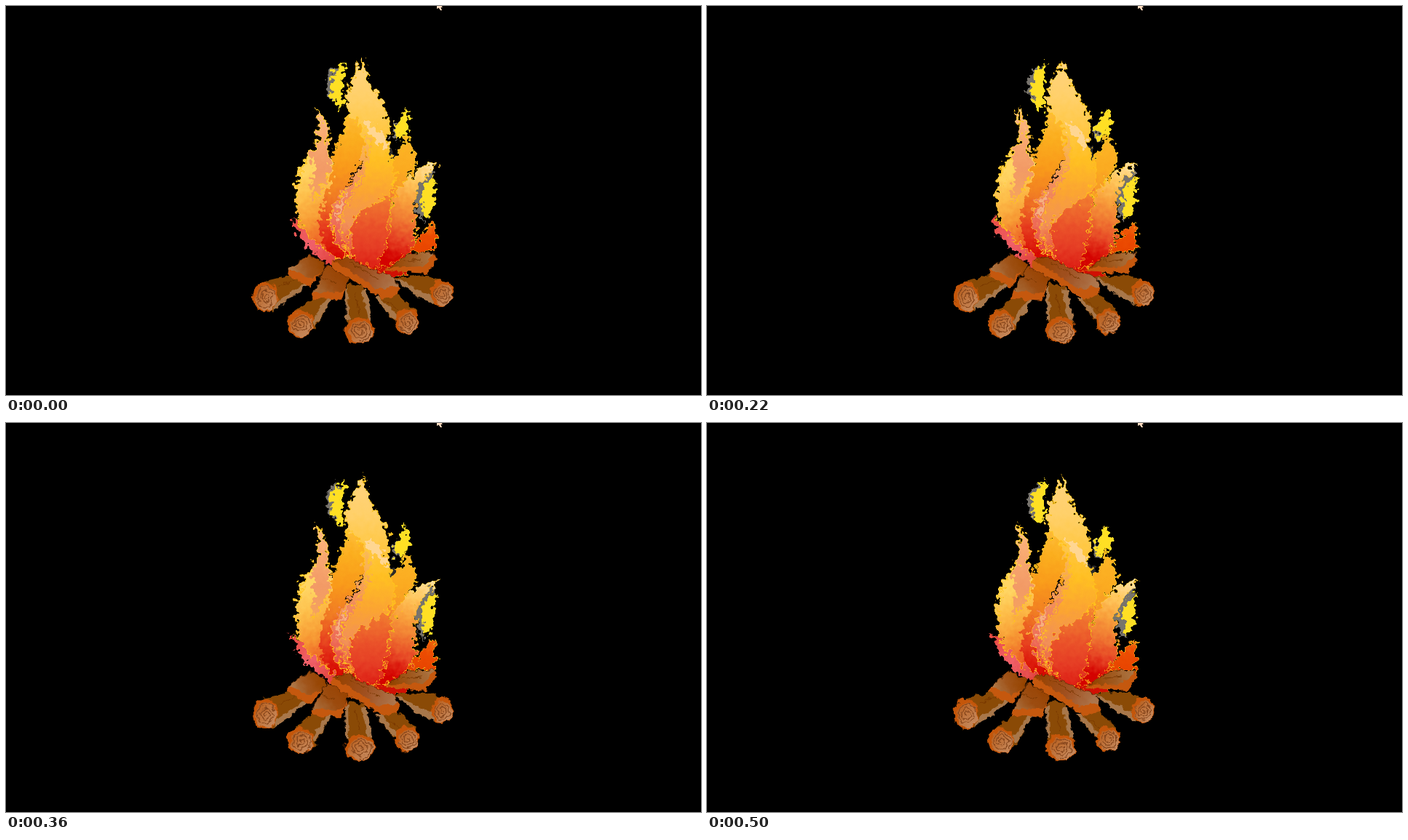
These frames come from a looping animation (955 px wide and 535 px high, 0.55 s). An HTML page:

```html
<!DOCTYPE html>
<html lang="en">
<head>
<meta charset="utf-8">
<title>Campfire</title>
<style>
html, body { margin: 0; width: 100%; height: 100%; overflow: hidden; background: #000; }
svg { display: block; width: 955px; height: 535px; }
</style>
</head>
<body>
<svg id="stage" viewBox="0 0 955 535" xmlns="http://www.w3.org/2000/svg"></svg>
<script>
const stage = document.getElementById('stage');

// Vertical or slanted gradient: line is [x1, y1, x2, y2], stops are evenly spaced
const grad = (id, [x1, y1, x2, y2], ...cols) =>
  `<linearGradient id="${id}" gradientUnits="userSpaceOnUse" x1="${x1}" y1="${y1}" x2="${x2}" y2="${y2}">` +
  cols.map((c, i) => `<stop offset="${i / (cols.length - 1)}" stop-color="${c}"/>`).join('') +
  '</linearGradient>';

const rough = (id, freq, octaves, scale) =>
  `<filter id="${id}" filterUnits="userSpaceOnUse" x="320" y="50" width="315" height="430" color-interpolation-filters="sRGB">
    <feTurbulence type="fractalNoise" baseFrequency="${freq}" numOctaves="${octaves}" result="n"/>
    <feDisplacementMap in="SourceGraphic" in2="n" scale="${scale}" xChannelSelector="R" yChannelSelector="G"/>
  </filter>`;

const shape = (d, fill, attrs = '') => `<path d="${d}" fill="${fill}" ${attrs}/>`;
const rim = (w = 1.3, c = '#ffc41c') => `stroke="${c}" stroke-width="${w}" stroke-linejoin="round"`;
const line = (d, w = 1.3) => shape(d, 'none', rim(w));

function logEnd(x, y, rx, ry, turn) {
  let d = '';
  for (let i = 0; i <= 60; i++) {
    const a = i / 60 * Math.PI * 5.6 + turn, r = 0.08 + 0.68 * i / 60;
    d += `${i ? 'L' : 'M'}${(x + 1 + Math.cos(a) * r * rx).toFixed(1)} ${(y + 1 + Math.sin(a) * r * ry).toFixed(1)}`;
  }
  return `<ellipse cx="${x}" cy="${y}" rx="${rx}" ry="${ry}" fill="#c4560a"/>
    <ellipse cx="${x + 1.5}" cy="${y + 2}" rx="${rx * 0.82}" ry="${ry * 0.82}" fill="url(#face)"/>
    ${shape(d, 'none', 'stroke="#86461c" stroke-width="1.3"')}`;
}

// Round log: body outline, pale lower side, cut end
const roundLog = (body, side, end) =>
  shape(body, '#8a4a06') + shape(side, '#a8774a') + logEnd(...end);

// Split log: upper face and orange cut edge
const splitLog = (top, edge, fill) =>
  shape(top, fill, 'stroke="#5c2a04" stroke-width=".8"') + shape(edge, '#c5580e');

const defs = [
  rough('flameEdge', 0.14, 2, 21),
  rough('logEdge', 0.12, 2, 9),
  grad('left', [402, 235, 458, 343], '#ffd563', '#fdbc48', '#f79a34', '#ee6426', '#dc1408'),
  grad('blush', [0, 140, 0, 268], '#ffbe86', '#f8a870', '#f29a66', '#f6a45c'),
  grad('amber', [0, 140, 0, 346], '#ffc040', '#fbae1e', '#f99a1a', '#f07a24', '#e63c1e', '#d60600'),
  grad('tongue', [0, 178, 0, 275], '#fdb626', '#fbaa20', '#f38a2c'),
  grad('main', [0, 80, 0, 345], '#ffd27c', '#ffd06a', '#ffc846', '#ffbf22', '#fba432', '#f29058', '#e84436'),
  grad('band', [0, 160, 0, 346], '#fcc458', '#f9ac50', '#f28a5c', '#ee6c58', '#e43c34'),
  grad('heart', [0, 245, 0, 362], '#f79030', '#ef702e', '#ea5129', '#e53c24', '#dc1c12'),
  grad('right', [580, 217, 540, 350], '#ffe0a0', '#ffc75c', '#f9a23c', '#f07a32', '#e64424', '#d40200'),
  grad('ember', [0, 295, 0, 340], '#f07010', '#ec4c02', '#e84400'),
  grad('low', [395, 290, 450, 358], '#e84a40', '#f0606a', '#e04038'),
  grad('woodA', [392, 365, 432, 348], '#ad7a4c', '#a0541a', '#964400'),
  grad('woodB', [425, 395, 462, 362], '#a87040', '#9c4c10', '#984200'),
  grad('woodC', [455, 348, 537, 386], '#964200', '#a05020', '#ae7a52'),
  grad('woodD', [530, 358, 588, 346], '#944400', '#a05a20', '#ac7848'),
  grad('face', [-1, 0, 1, 1], '#b85c18', '#c89068')
    .replace('gradientUnits="userSpaceOnUse" x1="-1" y1="0"', 'x1="0" y1="0"')
].join('');

const ghosts = [
  'M456 82C444 89 438 101 440 116C444 124 446 128 450 132L452 100Z',
  'M541 156C533 164 530 172 532 182L539 187L541 170Z',
  'M588 224C574 233 563 250 563 267C564 282 568 291 573 297L576 288C568 270 572 250 588 235Z'
].map(d => shape(d, '#77736c')).join('') +
  shape('M523 188L527 193L538 208L527 210Z', '#2d2b29');

const sparks = [
  'M466 78C455 84 447 96 446 111C447 126 452 136 461 143C465 132 461 122 462 109C462 98 467 90 466 78Z',
  'M549 138C547 149 536 158 534 171C534 178 537 183 541 186C549 180 555 171 555 159C554 150 549 146 549 138Z',
  'M591 234C579 241 572 252 571 266C571 278 573 285 577 291C587 285 590 275 588 263C586 252 591 246 591 234Z'
].map(d => shape(d, '#ffdf24')).join('');

const flames = ghosts + sparks +
  shape('M428 318L562 318L548 370L526 375L470 362Z', '#d61208') +
  shape('M587 296C580 309 568 312 563 323L552 342L588 338C592 325 591 311 587 296Z', 'url(#ember)', rim(1)) +
  shape('M426 139C432 150 443 160 443 180C441 195 444 208 449 215C462 235 470 290 470 350L450 352C425 335 401 305 399 278C397 245 402 215 420 200C432 188 430 160 426 139Z', 'url(#left)', rim()) +
  shape('M426 142C432 152 442 162 442 180C440 195 443 208 447 222C441 244 430 254 421 268C417 248 430 222 417 206C434 192 432 160 426 142Z', 'url(#blush)') +
  shape('M472 130L500 165C500 215 455 255 447 290C445 320 458 335 468 348L447 345C431 325 427 290 438 265C452 240 447 220 449 205C460 185 468 165 472 130Z', 'url(#amber)') +
  line('M471 148C466 168 458 186 449 203M446 228C438 246 430 258 421 271M417 206C408 214 405 232 402 246') +
  shape('M550 178C545 198 535 205 528 215L515 280L535 262C545 240 556 228 564 218C561 205 560 192 550 178Z', 'url(#tongue)', rim()) +
  shape('M490 72C486 88 468 106 467 130C467 150 476 152 484 160C500 190 490 225 472 250C455 275 447 290 455 310C460 325 468 335 473 345L480 345C470 325 470 300 482 288C500 275 530 262 534 238C536 215 524 205 524 185C530 160 524 145 512 125C500 112 495 95 490 72Z', 'url(#main)', rim()) +
  shape('M492 165C496 200 488 225 468 248C450 270 442 285 446 300C452 325 460 335 470 346C455 318 455 300 462 285C478 255 500 235 500 195Z', 'url(#band)') +
  shape('M492 159C508 164 522 176 524 198C512 189 500 178 492 159Z', '#ffd692') +
  shape('M470 252C458 268 452 284 455 298C460 286 462 274 470 252Z', '#f6b082') +
  line('M470 250C452 271 442 287 447 304C452 326 461 337 470 346M500 190C497 225 477 252 463 284C456 302 464 326 475 342') +
  shape('M534 240C532 262 500 272 482 288C470 302 470 325 478 345C486 358 500 362 512 362L524 330L528 280Z', 'url(#heart)', rim(1)) +
  shape('M593 217C578 218 560 226 550 238C535 255 528 270 528 290C526 320 520 340 510 362C535 360 555 340 563 318C565 300 560 285 563 262C568 240 582 232 593 217Z', 'url(#right)', rim(1)) +
  shape('M392 289C396 311 413 337 447 359L464 353C434 335 416 318 404 300Z', 'url(#low)') +
  line('M397 290C407 309 430 331 458 349M502 364C525 362 548 357 563 342') +
  shape('M500 362L556 358L549 371L528 376Z', '#d01004', rim(0.8));

const logs =
  roundLog('M354 379L396 369L413 383L366 420Z', 'M412 380L414 385L368 419L372 407Z', [356, 400, 17, 21, 1]) +
  roundLog('M396 420L420 402L447 403L424 444L404 450Z', 'M440 403L447 404L425 440L420 434Z', [404, 437, 18, 18.5, 2]) +
  roundLog('M466 390L472 382L492 386L503 436L469 440Z', 'M488 390L496 391L503 433L497 432ZM466 390L470 388L471 432L467 432Z', [486, 446, 20.5, 18, 3]) +
  roundLog('M508 402L538 396L564 420L542 442Z', 'M507 401L514 401L544 433L540 438Z', [551, 434, 16.5, 17.5, 4]) +
  roundLog('M533 373L578 370L600 378L592 411L568 401Z', 'M533 374L541 376L590 402L588 410L566 400Z', [599, 395, 15.5, 18, 5]) +
  splitLog('M388 362L417 341L440 354L436 366L421 379Z', 'M388 361L420 375L432 366L419 387L387 370Z', 'url(#woodA)') +
  splitLog('M553 341L589 340L581 360L524 361Z', 'M589 341L592 349L577 368L521 364L524 360L573 358Z', 'url(#woodD)') +
  splitLog('M441 357L471 374L462 396L421 395Z', 'M421 393L462 394L470 378L461 405L419 402Z', 'url(#woodB)') +
  splitLog('M449 350L468 345L500 361L534 374L540 388L510 392Z', 'M448 349L480 369L510 389L540 386L539 397L517 403L488 384L447 360Z', 'url(#woodC)') +
  shape('M472 352L512 376M430 372L452 380M545 351L572 349M374 386L398 376M480 396L486 424M520 404L540 420', 'none', 'stroke="#763600" stroke-width=".9"');

stage.innerHTML = `<defs>${defs}</defs><rect width="955" height="535"/>
  <g filter="url(#flameEdge)">${flames}</g>
  <g filter="url(#logEdge)">${logs}</g>
  ${shape('M592 0V4L594.5 2.5L597 6H599L597.5 2L600 1.5L598.5 0Z', '#ffdcc0')}`;

const noises = stage.querySelectorAll('feTurbulence');
const LOOP = 550;
const changes = [30, 80, 130, 170, 220, 270, 320, 360, 410, 460, 500];
let shown = -1;

function draw(ms) {
  const step = changes.filter(t => t <= ms).length;
  if (step === shown) return;
  shown = step;
  noises.forEach((n, i) => n.setAttribute('seed', 3 + step * 7 + i * 101));
}

function tick() {
  draw(performance.now() % LOOP);
  requestAnimationFrame(tick);
}
draw(0);
requestAnimationFrame(tick);
</script>
</body>
</html>
```
